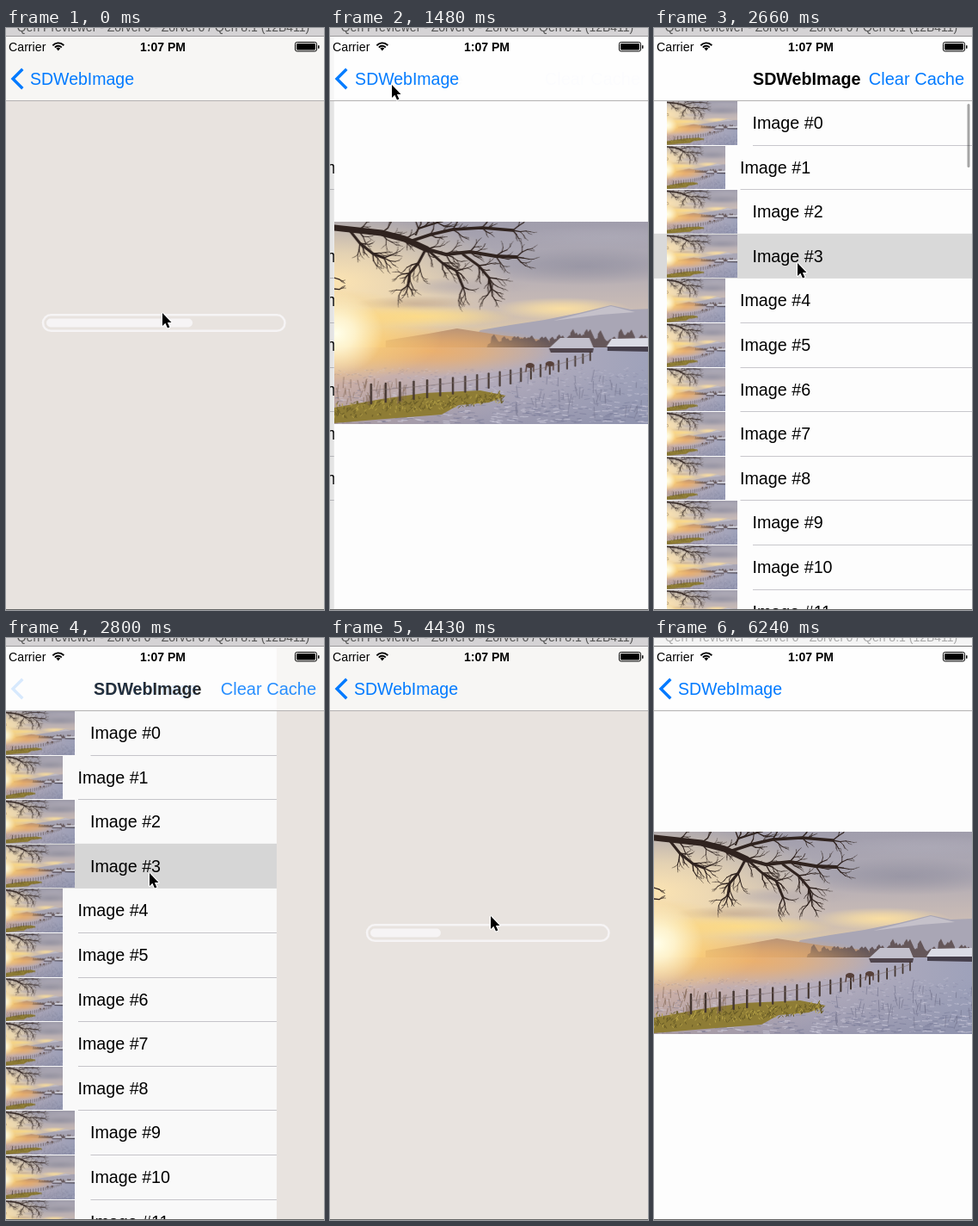
An HTML page with a canvas for the animation above (8850 ms loop, 370 px wide and 676 px high).

```html
<!DOCTYPE html>
<html lang="en">
<head>
<meta charset="utf-8">
<title>Image list</title>
<style>
html, body { margin: 0; width: 100%; height: 100%; overflow: hidden; background: #fdfdfd; }
canvas { display: block; width: 100vw; height: 100vh; }
</style>
</head>
<body>
<canvas id="stage" width="370" height="676"></canvas>
<script>
const W = 370, H = 676, LOOP = 8850;
const NAV_BOTTOM = 85, ROW = 51.6, PHOTO_Y = 225, PHOTO_H = 235;
const BLUE = '#007aff', PAPER = '#e8e3df', WHITE = '#fdfdfd';
const SANS = '"Liberation Sans", Arial, sans-serif';
const ctx = document.getElementById('stage').getContext('2d');
ctx.imageSmoothingQuality = 'high';

// Each step holds until the next: time, pointer x, pointer y.
const STEPS = [
  [0, 182, 331], [150, 182, 331], [300, 180, 325], [450, 170, 280], [600, 150, 210],
  [750, 125, 135], [900, 106, 89], [1050, 85, 72], [1190, 72, 66], [1340, 72, 66],
  [1490, 90, 100], [1630, 150, 215], [1770, 198, 310], [1920, 200, 312], [2070, 192, 300],
  [2210, 178, 283], [2360, 167, 273], [2660, 167, 273], [2800, 167, 273], [2950, 168, 275],
  [3100, 170, 280], [3250, 178, 300], [3390, 184, 316], [3540, 187, 323], [4430, 187, 323],
  [4580, 187, 323], [4880, 203, 365], [5030, 263, 535], [5180], [6240]
];

function line(c, points, width, color) {
  c.beginPath();
  points.forEach(([x, y]) => c.lineTo(x, y));
  c.lineWidth = width;
  c.strokeStyle = color;
  c.stroke();
}

function shape(c, points, color) {
  c.beginPath();
  points.forEach(([x, y]) => c.lineTo(x, y));
  c.fillStyle = color;
  c.fill();
}

function rect(x, y, w, h, color, c = ctx) {
  c.fillStyle = color;
  c.fillRect(x, y, w, h);
}

function pill(x, y, w, h, r, color) {
  ctx.beginPath();
  ctx.roundRect(x, y, w, h, r);
  ctx.fillStyle = color;
  ctx.fill();
}

function text(str, x, y, font, color, align = 'left') {
  ctx.font = font;
  ctx.fillStyle = color;
  ctx.textAlign = align;
  ctx.fillText(str, x, y);
}

function withAlpha(alpha, draw) {
  ctx.save();
  ctx.globalAlpha = alpha;
  draw();
  ctx.restore();
}

// Winter landscape, painted once and reused for the thumbnails.
function paintPhoto() {
  const canvas = document.createElement('canvas');
  canvas.width = W;
  canvas.height = PHOTO_H;
  const c = canvas.getContext('2d');
  c.lineCap = c.lineJoin = 'round';
  let seed = 7;
  const random = () => (seed = seed * 16807 % 2147483647) / 2147483647;
  const between = (a, b) => a + (b - a) * random();

  function gradient(x0, y0, x1, y1, ...colors) {
    const g = c.createLinearGradient(x0, y0, x1, y1);
    colors.forEach((color, i) => g.addColorStop(i / (colors.length - 1), color));
    return g;
  }
  function glow(x, y, rx, ry, rgb, alpha) {
    const g = c.createRadialGradient(0, 0, 0, 0, 0, 1);
    g.addColorStop(0, `rgba(${rgb},${alpha})`);
    g.addColorStop(.4, `rgba(${rgb},${alpha * .7})`);
    g.addColorStop(1, `rgba(${rgb},0)`);
    c.save();
    c.translate(x, y);
    c.scale(rx, ry);
    rect(-1, -1, 2, 2, g, c);
    c.restore();
  }

  rect(0, 0, W, 150, gradient(0, 0, 0, 150, '#a09dac', '#b0abb5', '#c9bbb5', '#ecd2a0'), c);
  glow(0, 70, 210, 85, '255,230,178', .95);
  glow(290, 52, 130, 22, '138,137,154', .6);
  glow(320, 18, 110, 14, '174,171,184', .7);
  glow(150, 75, 80, 11, '181,171,174', .7);
  glow(95, 95, 70, 9, '196,170,142', .7);
  glow(265, 101, 80, 13, '255,226,160', .9);
  glow(100, 110, 110, 13, '255,221,135', .9);

  shape(c, [[170, 126], [205, 120], [245, 114], [285, 106], [322, 97], [345, 102], [370, 101], [370, 150], [150, 150]], '#a9a6b5');
  shape(c, [[255, 115], [295, 105], [322, 98], [350, 105], [310, 108]], '#c5c1ca');
  shape(c, [[60, 138], [110, 130], [143, 124], [195, 132], [260, 139], [260, 155], [60, 155]], '#b49178');
  for (let x = 182; x < W; x += 4) {
    const h = between(6, x > 270 ? 24 : 17);
    shape(c, [[x - 5, 148], [x - 3, 147 - h * .8], [x, 147 - h], [x + 4, 147 - h * .6], [x + 6, 148]], '#65575a');
  }

  rect(0, 146, W, PHOTO_H - 146, gradient(0, 155, 370, 210, '#d8b4a2', '#b8afbd', '#9da1ba'), c);
  rect(0, 170, W, 65, gradient(0, 170, 0, 235, 'rgba(137,142,170,0)', 'rgba(128,132,161,.5)'), c);
  glow(110, 150, 150, 30, '237,175,105', .95);
  glow(0, 133, 125, 55, '255,213,119', .95);
  glow(2, 130, 55, 48, '255,255,235', 1);

  for (let i = 0; i < 750; i++) {
    const x = between(0, W), y = between(170, 234), size = (y - 140) / 28;
    line(c, [[x, y], [x + size * between(1, 2.5), y + between(-1, 1)]], size * .35,
      i % 2 ? 'rgba(214,211,226,.55)' : 'rgba(104,108,140,.4)');
  }
  shape(c, [[0, 216], [55, 206], [105, 199], [170, 196], [200, 202], [180, 210], [145, 213], [125, 224], [60, 229], [0, 234]], '#8e7c35');
  for (let i = 0; i < 260; i++) {
    const x = between(0, 195), y = between(200 + (195 - x) * .06, 231 - x * .1);
    line(c, [[x, y], [x + between(-2, 3), y - between(1, 4)]], 1, i % 3 ? '#675a26' : '#b8a448');
  }
  for (let i = 0; i < 90; i++) {
    const left = i < 38, x = left ? between(0, 85) : between(205, W), y = between(left ? 192 : 185, left ? 214 : 230);
    line(c, [[x, y], [x + between(-3, 3), y - between(5, 14)]], .6, left ? '#806652' : '#73728b');
  }

  shape(c, [[250, 147], [302, 147], [301, 152], [252, 152]], '#50454d');
  shape(c, [[250, 147], [263, 135], [297, 135], [302, 147]], '#c2c0cc');
  shape(c, [[318, 145], [370, 145], [370, 151], [318, 150]], '#453f4c');
  shape(c, [[317, 145], [323, 136], [370, 135], [370, 145]], '#dadbe5');

  const fence = u => [
    43 * (1 - u) ** 2 + 430 * u * (1 - u) + 298 * u * u,
    211 * (1 - u) ** 2 + 390 * u * (1 - u) + 161 * u * u
  ];
  for (let i = 0; i <= 20; i++) {
    const [x, y] = fence(i / 20), h = 22 - i * .6;
    line(c, [[x, y], [x, y - h]], 2.5 - i * .04, '#43352f');
    if (i) {
      const [px, py] = fence((i - 1) / 20);
      line(c, [[px, py - h * .7], [x, y - h * .7]], .5, '#796866');
    }
  }
  for (const [x, y] of [[228, 167], [251, 165]]) {
    c.beginPath();
    c.ellipse(x, y, 5, 3, 0, 0, 7);
    c.fillStyle = '#574039';
    c.fill();
    line(c, [[x - 4, y], [x - 5, y + 7]], 1.5, '#574039');
    line(c, [[x + 4, y], [x + 4, y + 7]], 1.5, '#574039');
  }

  const BARK = '#30231f';
  function twig(x, y, angle, length, width) {
    if (length < 3) return;
    const nx = x + Math.cos(angle) * length, ny = y + Math.sin(angle) * length;
    line(c, [[x, y], [nx, ny]], width, BARK);
    twig(nx, ny, angle + between(-.5, .3), length * .78, width * .72);
    if (random() < .8) twig(nx, ny, angle + (random() < .5 ? -1 : 1) * between(.4, .9), length * .66, width * .6);
  }
  const limbs = [
    [7, [0, 7], [28, 10], [55, 13], [82, 20], [108, 32]],
    [4, [108, 32], [130, 38], [158, 35], [188, 40], [212, 41]],
    [3.5, [88, 23], [112, 15], [138, 9], [172, 7], [208, 10]],
    [3, [108, 32], [126, 48], [142, 57], [150, 76]],
    [3, [150, 38], [168, 51], [180, 65], [183, 78]],
    [3, [18, 10], [30, 25], [45, 37], [58, 42]],
    [3, [106, 33], [98, 48], [88, 60], [86, 74]],
    [2, [95, 15], [98, 8], [120, 1]]
  ];
  for (const [width, ...points] of limbs) {
    line(c, points, width, BARK);
    points.slice(1).forEach(([x, y], i) => {
      const [px, py] = points[i], angle = Math.atan2(y - py, x - px);
      for (const turn of [-.75, .1, .8]) twig(x, y, angle + turn, between(6, 9.5), 1.4);
    });
  }
  twig(0, 65, .3, 6, 1.3);
  twig(0, 78, .1, 6, 1.3);
  return canvas;
}
const photo = paintPhoto();

function drawList(t, x) {
  const selected = t >= 2660;
  rect(x, 10, W, H, WHITE);
  for (let i = 0; i < 12; i++) {
    const y = NAV_BOTTOM + i * ROW;
    const wide = [0, 2, 9, 10, 11].includes(i) || selected && i === 3;
    const left = wide ? 115 : 100.5;
    if (selected && i === 3) rect(x, y - 1, W, ROW + .5, '#d9d9d9');
    else if (!selected || i !== 2) rect(x + left, Math.round(y + ROW - 1), W - left, 1, '#c8c7cc');
    ctx.drawImage(photo, x + 14.5, y, wide ? 82 : 68, 50.6);
    text('Image #' + i, x + left - .5, y + 32, '19.7px ' + SANS, '#000');
  }
  if (t >= 1920 && t < 2950) pill(x + 364.5, 88, 3, 74, 1.5, 'rgba(0,0,0,.35)');
}

function drawPlaceholder(x) {
  const GREY = '#a5a19f';
  ctx.save();
  ctx.translate(x, 0);
  ctx.lineCap = ctx.lineJoin = 'round';
  ctx.lineWidth = 3.4;
  ctx.strokeStyle = GREY;
  ctx.beginPath();
  ctx.roundRect(157.7, 315.5, 45, 44, 3);
  ctx.moveTo(169, 308);
  ctx.lineTo(206, 308);
  ctx.quadraticCurveTo(209.5, 308, 209.5, 311.5);
  ctx.lineTo(209.5, 352);
  ctx.stroke();
  pill(167.5, 324, 8, 8, 4, GREY);
  line(ctx, [[163.5, 353], [174, 343], [180.5, 348.5], [192, 337], [197, 341]], 3, GREY);
  text('点击下载图片', 183.5, 380, '13.4px "Noto Sans CJK SC", "Noto Sans CJK", sans-serif', GREY, 'center');
  ctx.restore();
}

function drawProgress(value) {
  const color = '#f6f4f5';
  ctx.beginPath();
  ctx.roundRect(43, 333.3, 281.5, 18.5, 9.25);
  ctx.lineWidth = 2.5;
  ctx.strokeStyle = color;
  ctx.stroke();
  pill(47, 337.5, 273 * value, 10, 5, color);
}

function drawDetail(t, x) {
  const loading = t < 150 || t >= 4430 && t < 4580;
  const empty = t >= 2660 && t < 4430;
  rect(x, 10, W, H, loading || empty ? PAPER : WHITE);
  if (loading) drawProgress(t < 150 ? .623 : .3);
  else if (empty) drawPlaceholder(x);
  else ctx.drawImage(photo, x, PHOTO_Y);
}

function drawNav(p) {
  rect(0, 10, W, NAV_BOTTOM - 10, 'rgba(255,255,255,.68)');
  rect(0, 84, W, 1, '#b3b1b1');
  withAlpha(1 - p, () => {
    text('SDWebImage', 115 - 87 * p, 66, 'bold 19.7px ' + SANS, '#000');
    text('Clear Cache', 361, 66, '20px ' + SANS, BLUE, 'right');
  });
  withAlpha(p, () => {
    line(ctx, [[19.3, 47.8], [8, 59], [19.3, 70.2]], 3.4, BLUE);
    text('SDWebImage', 115 - 87 * p, 66, '19.5px ' + SANS, BLUE);
  });
}

function drawStatus() {
  text('Carrier', 3, 27, '14.2px ' + SANS, '#000');
  text('1:07 PM', 182.5, 27, 'bold 14px ' + SANS, '#000', 'center');
  for (const r of [8.6, 5.2]) {
    ctx.beginPath();
    ctx.arc(60.8, 26, r, -Math.PI * .77, -Math.PI * .23);
    ctx.lineWidth = 1.9;
    ctx.strokeStyle = '#000';
    ctx.stroke();
  }
  shape(ctx, [[60.8, 26.4], [58.3, 23.6], [60.8, 22.6], [63.3, 23.6]], '#000');
  ctx.beginPath();
  ctx.roundRect(336.5, 16.5, 25, 10.5, 2);
  ctx.lineWidth = 1;
  ctx.stroke();
  pill(338, 18, 22, 7.5, 1, '#000');
  pill(363, 20, 1.5, 4, 1, '#000');
}

function drawWindow(active) {
  rect(0, 0, W, 9, active ? '#d5d3d5' : '#f4f4f4');
  rect(0, 9, W, 1, active ? '#9b999b' : '#777');
  text('Qen Previewer - Zorvel 6 - Zorvel 6 / Qen 8.1 (12B411)', 183, 4, '14px ' + SANS, active ? '#555' : '#aaa', 'center');
  rect(0, 675, W, 1, '#666');
}

function drawPointer(x, y) {
  ctx.save();
  ctx.translate(x, y);
  ctx.lineJoin = 'round';
  const arrow = [[0, 0], [0, 15], [3.4, 11.8], [6, 17.6], [8.4, 16.5], [5.9, 10.9], [10.5, 10.9], [0, 0]];
  line(ctx, arrow, 2.2, '#fff');
  shape(ctx, arrow, '#000');
  ctx.restore();
}

// Remaining distance of a critically damped slide.
function remaining(ms) {
  const s = Math.max(0, ms) * .017;
  return s > 8.5 ? 0 : Math.exp(-s) * (1 + s);
}

function draw(now) {
  const time = now % LOOP;
  const [t, px, py] = STEPS.findLast(step => step[0] <= time);
  const p = t < 2660 ? remaining(t - 1330) : 1 - remaining(t - 2760);

  if (p < 1) {
    drawList(t, -W * .3 * p);
    rect(0, 10, W, H, `rgba(0,0,0,${.1 * p})`);
  }
  if (p > 0) drawDetail(t, W * (1 - p));
  drawNav(p);
  drawStatus();
  drawWindow(t < 6240);
  if (px !== undefined) drawPointer(px, py);
}

const start = performance.now();
function tick() {
  draw(performance.now() - start);
  requestAnimationFrame(tick);
}
tick();
</script>
</body>
</html>
```
